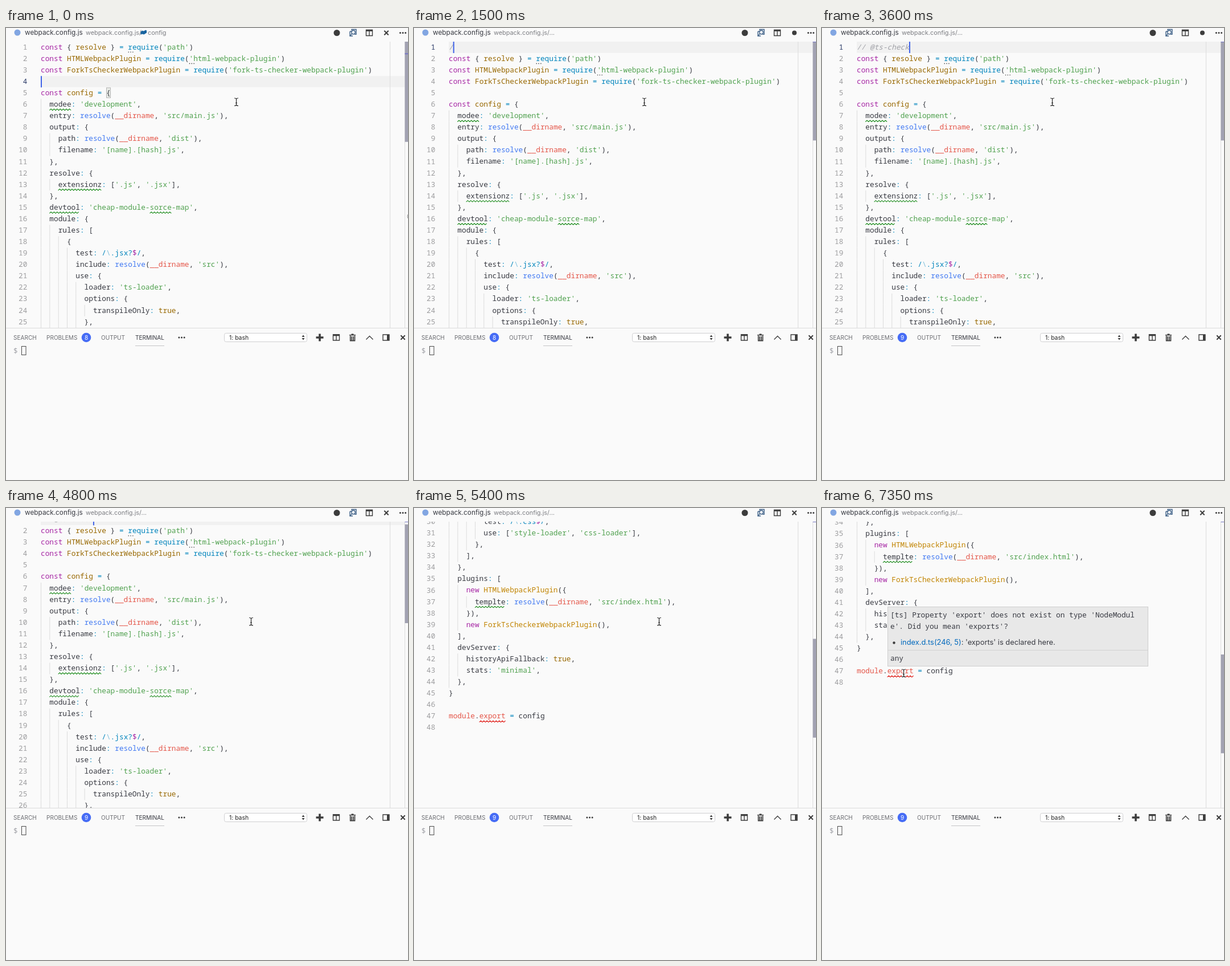
An HTML page that plays this animation: 706x793 px, repeating every 8 s.

```html
<!DOCTYPE html>
<html lang="en">
<head>
<meta charset="utf-8">
<title>Type checking a config file</title>
<style>
html, body { margin: 0; width: 100%; height: 100%; overflow: hidden; background: #fafafa; }
svg { display: block; }
text { white-space: pre; font-family: Inter, "Open Sans", sans-serif; fill: #383a42; }
.mono text { font: 12.77px "Noto Sans Mono", "DejaVu Sans Mono", monospace; font-variant-ligatures: none; }
.num text { text-anchor: end; fill: #9d9d9f; }
.num text.current { fill: #2b3a67; }
.kw { fill: #a626a4; }
.str { fill: #50a14f; }
.var, .lit { fill: #986801; }
.cls { fill: #c18401; }
.fn { fill: #4078f2; }
.op, .req, .rx { fill: #0184bc; }
.esc { fill: #7fbfdc; }
.red { fill: #e45649; }
.mono .comment { fill: #a0a1a7; font-style: italic; }
.guide { stroke: #dcdcdc; }
.squiggle { fill: none; stroke: #188a18; stroke-width: 1.1; }
.squiggle.error { stroke: #e0201b; }
.tabs text { font-size: 10.05px; fill: #6c6d72; }
.tabs .active { fill: #383a42; }
.tabs .choice { font-size: 10.4px; fill: #222; }
.icon { fill: none; stroke: #3c3c3c; stroke-width: 1.4; }
.solid { fill: #3c3c3c; }
.card { fill: #e8e8e8; stroke: #cecece; }
</style>
</head>
<body>
<svg width="706" height="793" viewBox="0 0 706 793">
  <defs>
    <clipPath id="pane"><rect y="24" width="706" height="502"/></clipPath>
    <g id="split">
      <path class="icon" d="M-5.5-5h11V5h-11zM0-5V5"/>
      <path class="solid" d="M-6-5.7H6v3H-6z"/>
    </g>
    <path id="cross" class="icon" d="M-3.7-3.7 3.7 3.7M3.7-3.7-3.7 3.7" style="stroke-width:2"/>
    <g id="dots" class="solid"><circle cx="-4.6" r="1.5"/><circle r="1.5"/><circle cx="4.6" r="1.5"/></g>
    <path id="beam" d="M-3.5-6.5q3 0 3.5 1.5.5-1.5 3.5-1.5M0-5V5.5M-3.5 7q3 0 3.5-1.5.5 1.5 3.5 1.5M-1.5 2h3"/>
  </defs>

  <g clip-path="url(#pane)">
    <g id="scroll" class="mono">
      <rect id="row" x="61" width="640" height="19.6" fill="#f1f1f1"/>
      <g id="numbers" class="num"></g>
      <rect id="bracket" x="176.5" y="104.9" width="7" height="17.5" fill="#e9ece7" stroke="#b4b4b4"/>
      <g id="code"></g>
      <text id="typed" class="comment" x="61" y="37.7"></text>
      <rect id="caret" width="2" height="20" fill="#3f62e8"/>
    </g>
    <path d="M674.5 24V526M700.5 24V526" stroke="#dcdcdc"/>
    <rect id="thumb" x="700.5" width="5.5" fill="#a2a2b2"/>
    <rect id="mark" x="700.5" width="5.5" height="2" fill="#7677c4"/>
    <path id="edge" d="M706 327q-2 3.5 0 7" fill="none" stroke="#8c8c8c"/>
  </g>

  <g id="header">
    <circle cx="20" cy="8" r="5.5" fill="#82a6e2"/>
    <text x="33" y="12" font-size="11.8">webpack.config.js</text>
    <text id="crumb" x="140" y="12" font-size="10.9" style="fill:#7d7e83"></text>
    <g id="symbol">
      <path d="M236.500 6.500l3-2 2 1 4-2 1.500 1v4l-5 3-2-1-3.500 1z" fill="#17639f"/>
      <text x="249" y="12" font-size="10.9" style="fill:#7d7e83">config</text>
    </g>
    <circle class="solid" cx="581" cy="8.500" r="5.500"/>
    <g class="icon" style="stroke:#3c5f86">
      <path d="M607 4V2.500h8V11h-3M604 6h3M604 6v8h5"/>
      <circle cx="610" cy="7.500" r="3.200"/><path d="M607.600 10l-3.600 4"/>
    </g>
    <use href="#split" x="638" y="8.500"/>
    <use id="close" href="#cross" x="668" y="8.500"/>
    <circle id="dirty" class="solid" cx="668" cy="8.500" r="4"/>
    <use href="#dots" x="697" y="8.500"/>
  </g>

  <g class="tabs">
    <path d="M0 526.500H706" stroke="#dbdbdc"/>
    <text x="13" y="546.800">SEARCH</text>
    <text x="71" y="546.800">PROBLEMS</text>
    <circle cx="141" cy="543" r="8.300" fill="#466cf5"/>
    <text id="count" x="141" y="546.600" text-anchor="middle" style="fill:#fff"></text>
    <text x="167" y="546.800">OUTPUT</text>
    <text class="active" x="227" y="546.800">TERMINAL</text>
    <path d="M227 557.500H278" stroke="#c4c4c6"/>
    <use href="#dots" x="308.500" y="543"/>
    <rect x="383.500" y="535.500" width="145" height="15" rx="3" fill="#fff" stroke="#cfcfd1"/>
    <text class="choice" x="392" y="546.800">1: bash</text>
    <path class="solid" d="M519.500 542l2.500-3.500 2.500 3.500zM519.500 544l2.500 3.500 2.500-3.500z"/>
    <path class="icon" d="M551 536.500v13M544.500 543h13" style="stroke-width:3.600"/>
    <use href="#split" x="580" y="543"/>
    <path class="solid" d="M603 538h3.500v-1.500h4V538h3.500v1.600h-11z"/>
    <path class="icon" d="M604.700 540v8.700h7.800V540M607.200 541v7M610 541v7" style="stroke-width:1.700"/>
    <path class="icon" d="M632.500 546.500l6-6 6 6"/>
    <path class="icon" d="M662 538h11v10h-11z"/><path class="solid" d="M669 538h4v10h-4z"/>
    <use href="#cross" x="697" y="543"/>
  </g>
  <g class="mono">
    <text x="13" y="570.500" style="fill:#a0a1a7">$</text>
    <rect x="27.500" y="558.500" width="7.500" height="15" fill="none" stroke="#4a4a4a"/>
  </g>

  <g id="suggest" class="mono">
    <rect class="card" x=".5" y="44.500" width="399" height="59"/>
    <rect x="1" y="45" width="398" height="19.500" fill="#d4d8e4"/>
    <text x="22" y="58.500">@ts-check</text>
    <text x="22" y="78.500">@ts-ignore</text>
    <text x="22" y="98.500">@ts-nocheck</text>
    <path class="icon" d="M6 51h9v7H6zM6 71h9v7H6zM6 91h9v7H6z"/>
  </g>

  <g id="hover" class="mono">
    <rect class="card" x="115.500" y="173.500" width="457" height="104"/>
    <path d="M115 249.500H573" stroke="#d2d2d2"/>
    <text x="120" y="191.700">[ts] Property 'export' does not exist on type 'NodeModul</text>
    <text x="120" y="211.700">e'. Did you mean 'exports'?</text>
    <circle class="solid" cx="126.500" cy="236.500" r="2.200"/>
    <text x="138" y="240" style="font:12.85px Inter,sans-serif"><tspan fill="#0069bd">index.d.ts(246, 5)</tspan>: 'exports' is declared here.</text>
    <text x="120" y="267.700">any</text>
  </g>

  <g id="mouse" fill="none">
    <use href="#beam" stroke="#fff" stroke-width="2.600"/>
    <use href="#beam" stroke="#222" stroke-width="1.200"/>
  </g>
</svg>

<script>
const SOURCE = String.raw`const { resolve } = require('path')
const HTMLWebpackPlugin = require('html-webpack-plugin')
const ForkTsCheckerWebpackPlugin = require('fork-ts-checker-webpack-plugin')

const config = {
  modee: 'development',
  entry: resolve(__dirname, 'src/main.js'),
  output: {
    path: resolve(__dirname, 'dist'),
    filename: '[name].[hash].js',
  },
  resolve: {
    extensionz: ['.js', '.jsx'],
  },
  devtool: 'cheap-module-sorce-map',
  module: {
    rules: [
      {
        test: /\.jsx?$/,
        include: resolve(__dirname, 'src'),
        use: {
          loader: 'ts-loader',
          options: {
            transpileOnly: true,
          },
        },
      },
      {
        test: /\.css$/,
        use: ['style-loader', 'css-loader'],
      },
    ],
  },
  plugins: [
    new HTMLWebpackPlugin({
      templte: resolve(__dirname, 'src/index.html'),
    }),
    new ForkTsCheckerWebpackPlugin(),
  ],
  devServer: {
    historyApiFallback: true,
    stats: 'minimal',
  },
}

module.export = config
`;
const LEFT = 61, TOP = 24, ROW = 20.08, CHAR = 7.662, HEIGHT = 502;
const LOOP = 8000, STEP = 150;
const TOKENS = /(?<str>'[^']*')|(?<rx>\/\\[^,]*\/)|(?<kw>\b(?:const|new)\b)|(?<lit>\btrue\b)|(?<var>(?<=const (?:\{ )?)\w+)|(?<cls>(?<=new )\w+)|(?<req>require)|(?<fn>resolve(?=\())|(?<red>__dirname|module(?=\.)|export)|(?<op>[=:])/g;
const MISSPELT = /modee|extensionz|devtool|sorce|templte|export/g;

const $ = id => document.getElementById(id);
const show = (id, on) => $(id).style.display = on ? '' : 'none';
const move = (id, x, y) => $(id).setAttribute('transform', `translate(${x} ${y})`);

function add(parent, tag, attrs, text = '') {
  const node = document.createElementNS('http://www.w3.org/2000/svg', tag);
  for (const key in attrs) node.setAttribute(key, attrs[key]);
  node.textContent = text;
  return parent.appendChild(node);
}

function drawText(line, y) {
  const text = add($('code'), 'text', { x: LEFT, y });
  const span = (value, kind) => value && add(text, 'tspan', kind ? { class: kind } : {}, value);
  let end = 0;
  for (const match of line.matchAll(TOKENS)) {
    const kind = Object.keys(match.groups).find(key => match.groups[key]);
    span(line.slice(end, match.index));
    if (kind === 'rx') {
      for (const c of match[0]) span(c, { '\\': 'esc', '$': 'kw' }[c] || 'rx');
    } else span(match[0], kind);
    end = match.index + match[0].length;
  }
  span(line.slice(end));
}

function drawSquiggle(line, top) {
  for (const { 0: word, index } of line.matchAll(MISSPELT)) {
    const x = LEFT + index * CHAR, half = 2.7;
    let d = `M${x} ${top + 20}`;
    for (let i = 1; i * half <= word.length * CHAR; i++)
      d += `L${x + i * half} ${top + (i % 2 ? 17.6 : 20)}`;
    add($('code'), 'path', { d, class: word === 'export' ? 'squiggle error' : 'squiggle' });
  }
}

const lines = SOURCE.split('\n');
lines.forEach((line, i) => {
  const top = TOP + i * ROW;
  for (let col = 0; col < line.search(/\S|$/); col += 2) {
    const x = LEFT + .5 + col * CHAR;
    add($('code'), 'path', { class: 'guide', d: `M${x} ${top}v${ROW}` });
  }
  drawText(line, top + 13.7);
  drawSquiggle(line, top);
});
[[20, 0], [34, 1]].forEach(([col, row]) => {
  for (let i = 0; i < 3; i++)
    add($('code'), 'circle', { cx: LEFT + col * CHAR + 1 + i * 3.8, cy: TOP + row * ROW + 18.3, r: .8, class: 'solid' });
});
const numbers = Array.from({ length: lines.length + 1 }, (_, i) =>
  add($('numbers'), 'text', { x: 37.3, y: TOP + i * ROW + 13.7 }, i + 1));

// Value of the last key at or before t.
const hold = (keys, t) => keys.reduce((value, [time, next]) => t >= time ? next : value, keys[0][1]);

function tween(keys, t) {
  const i = keys.findIndex(([time]) => time > t);
  if (i < 0) return keys[keys.length - 1][1];
  if (i === 0) return keys[0][1];
  const [t0, a] = keys[i - 1], [t1, b] = keys[i];
  return a + (b - a) * (t - t0) / (t1 - t0);
}

function ease(t, from, to) {
  const p = Math.min(1, Math.max(0, (t - from) / (to - from)));
  return p * p * (3 - 2 * p);
}

const ENTER = 750, SAVE = 3750, ACCEPT = 2550;
const caretRow = [[0, 3], [150, 2], [300, 1], [450, 0], [ENTER, 1], [1200, 0]];
const caretOn = [[0, true], [3000, false], [3600, true], [4200, false], [4650, true]];
const typing = [[0, ''], [1500, '/'], [1650, '//'], [1800, '// '], [1950, '// @'], [2250, '// @t'], [ACCEPT, '// @ts-check']];
const scrolling = [[4500, 0], [4650, 3], [4800, 13.6], [4950, 150], [5100, 331.3], [5250, 490], [5400, 592], [5550, 651], [5700, 671]];

function render(t) {
  const inserted = t >= ENTER, row = hold(caretRow, t), typed = hold(typing, t);
  const scroll = tween(scrolling, t);
  const ratio = HEIGHT / ((lines.length - 1 + inserted) * ROW + HEIGHT);
  const rowY = TOP + row * ROW;

  move('scroll', 0, -scroll);
  move('code', 0, inserted ? ROW : 0);
  $('row').setAttribute('y', rowY);
  $('typed').textContent = typed;
  move('caret', LEFT + typed.length * CHAR, rowY);
  show('caret', hold(caretOn, t));
  numbers.forEach((node, i) => node.classList.toggle('current', i === row));
  $('thumb').setAttribute('y', TOP + scroll * ratio);
  $('thumb').setAttribute('height', HEIGHT * ratio - 1);
  $('mark').setAttribute('y', TOP - 1 + row * ROW * ratio);

  const first = t < STEP, dirty = inserted && t < SAVE;
  show('bracket', first);
  show('edge', first);
  show('symbol', first);
  $('crumb').textContent = first ? 'webpack.config.js/' : 'webpack.config.js/...';
  show('dirty', dirty);
  show('close', !dirty);
  $('count').textContent = t < 3150 ? 8 : 9;

  show('suggest', t >= 1950 && t < ACCEPT);
  move('suggest', t < 2250 ? 84 : 92, 0);
  show('hover', t >= 7350);
  const a = ease(t, 3600, 4200), b = ease(t, 5850, 6900);
  move('mouse', 404.5 + 26 * a - 287 * b, 129.5 + 69.5 * a + 90.5 * b);
}

const start = performance.now();
function frame() {
  const t = (performance.now() - start) % LOOP;
  render(Math.floor(t / STEP) * STEP);
  requestAnimationFrame(frame);
}
frame();
</script>
</body>
</html>
```
